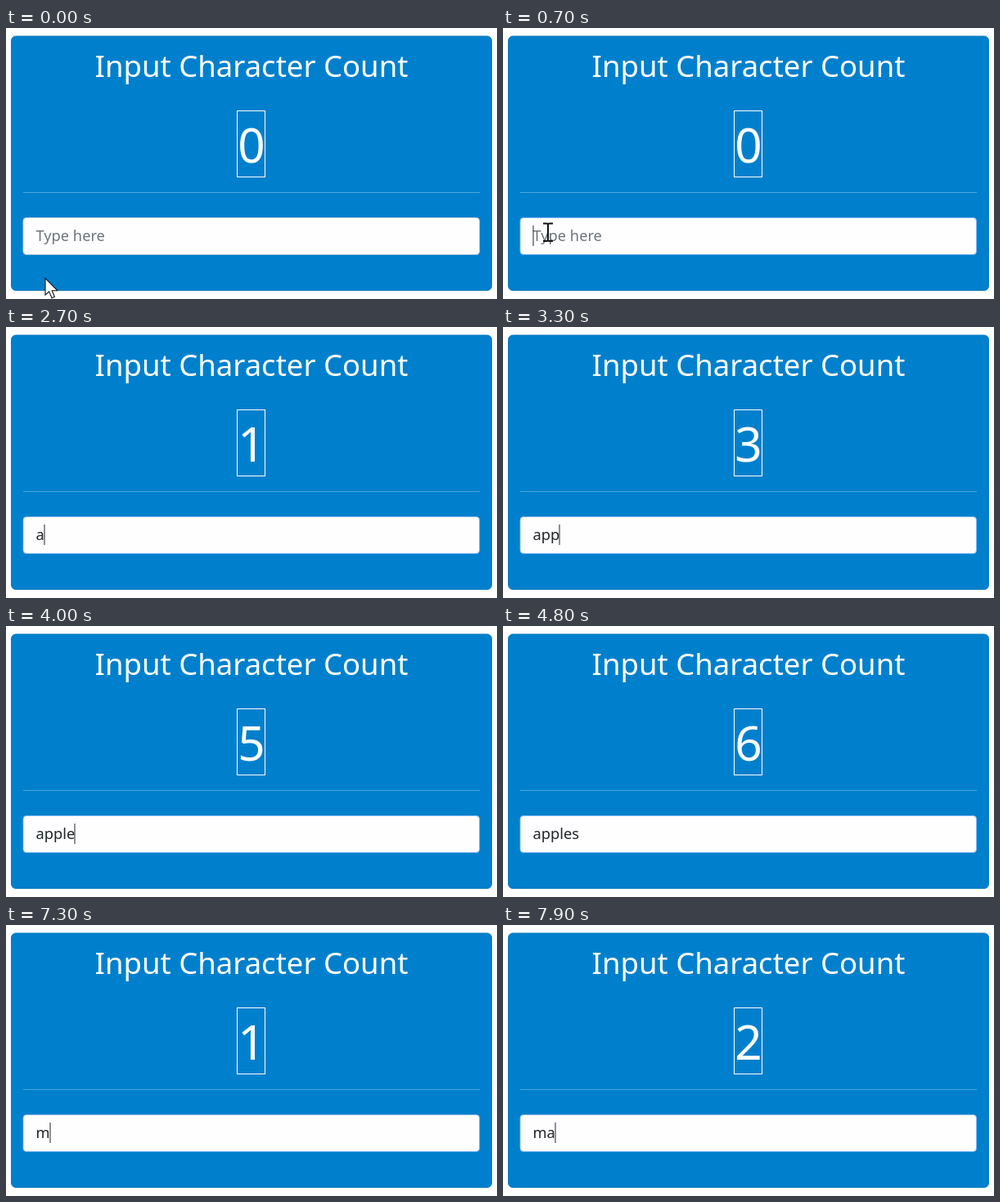
Write an HTML page that moves like this. It is 600 px wide and 332 px high and loops after 8000 ms.

```html
<!DOCTYPE html>
<html lang="en">
<head>
<meta charset="utf-8">
<title>Input Character Count</title>
<style>
  html, body { margin: 0; width: 100%; height: 100%; overflow: hidden; background: #fff; }
  svg { display: block; width: 600px; height: 332px; }
  text { font-family: "Noto Sans", "Open Sans", sans-serif; white-space: pre; }
  .head { fill: #fff; text-anchor: middle; }
  #field { font-size: 18.25px; }
</style>
</head>
<body>
<svg viewBox="0 0 600 332">
  <rect x="6.5" y="10" width="587" height="311.5" rx="5.5" fill="#0080cc" stroke="#0074b9" stroke-width=".9"/>
  <text class="head" x="300" y="60" font-size="36.5">Input Character Count</text>
  <rect x="282.5" y="101.5" width="34" height="81" fill="none" stroke="#fff"/>
  <text class="head" id="count" x="300" y="165" font-size="58.4">0</text>
  <rect x="21" y="201" width="558" height="1" fill="#fff" opacity=".3"/>
  <rect id="box" x="21" y="232.5" width="557.5" height="45" rx="4" fill="#fefdff" stroke-width=".9"/>
  <text id="field" x="36.5" y="261"></text>
  <rect id="caret" y="242" width="1" height="25" fill="#212529"/>
  <path id="arrow" d="M0 0V20.5L4.7 16.3 8 24.2 11.4 22.8 8.2 15.2H14.8Z" fill="#fff" stroke="#111" stroke-width="1.1"/>
  <path id="beam" d="M-6-10.5H-1.5Q0-10.5 0-9 0-10.5 1.5-10.5H6M0-10V10M-6 11H-1.5Q0 11 0 9.5 0 11 1.5 11H6" fill="none" stroke="#111" stroke-width="2"/>
</svg>
<script>
const LOOP = 8000, FOCUS = 600, BLINK = 530;
// [time, field value]
const keys = [
  [FOCUS, ""], [2400, "a"], [2800, "ap"], [3100, "app"], [3400, "appl"], [3700, "apple"], [4250, "apples"],
  [5000, "apple"], [5200, "appl"], [5400, "app"], [5600, "ap"], [5750, "a"], [5900, ""],
  [7300, "m"], [7700, "ma"]
];
const [count, box, field, caret, arrow, beam] =
  ["count", "box", "field", "caret", "arrow", "beam"].map(id => document.getElementById(id));

const show = (el, on) => el.setAttribute("visibility", on ? "visible" : "hidden");

function drawMouse(t) {
  const p = Math.min(1, Math.max(0, (t - 100) / 400));
  const ease = p * p * (3 - 2 * p);
  const x = 48 + 7 * ease, y = 306.5 - 56.5 * ease;
  const inside = y < 277;
  for (const el of [arrow, beam]) el.setAttribute("transform", `translate(${x} ${y})`);
  show(arrow, !inside);
  show(beam, inside && t < keys[1][0]);
}

function draw(t) {
  const [since, value] = keys.filter(k => k[0] <= t).pop() || [0, ""];
  const focused = t >= FOCUS;
  count.textContent = value.length;
  field.textContent = value || "Type here";
  field.setAttribute("fill", value ? "#212529" : "#6c757d");
  box.setAttribute("stroke", focused ? "#86b7fe" : "#ced4da");
  caret.setAttribute("x", Math.round(36.5 + (value ? field.getComputedTextLength() : 0)) - .5);
  show(caret, focused && (t - since) % (2 * BLINK) < BLINK);
  drawMouse(t);
}

const start = performance.now();
function tick() {
  draw((performance.now() - start) % LOOP);
  requestAnimationFrame(tick);
}
tick();
</script>
</body>
</html>
```
